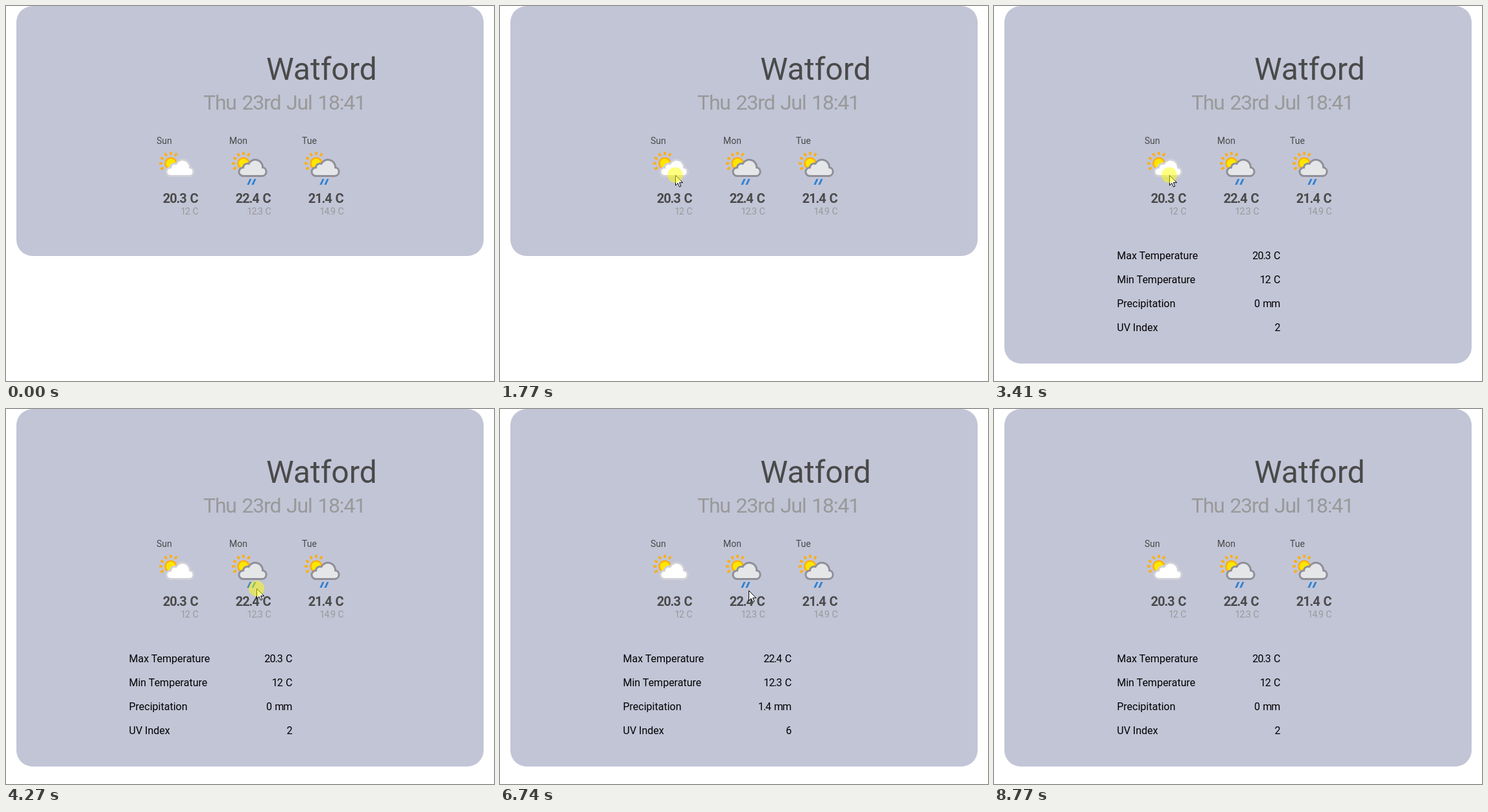
Animation, 752 px wide and 579 px high, one loop 9.79 s. Source, as an HTML page:

```html
<!DOCTYPE html>
<html lang="en">
<head>
<meta charset="utf-8">
<title>Weather forecast</title>
<style>
html, body { margin: 0; width: 100%; height: 100%; overflow: hidden; background: #fff; }
svg { display: block; width: 752px; height: 579px; font-family: Roboto, "Open Sans", sans-serif; }
.city { font-size: 48px; fill: #4a4a4a; }
.date { font-size: 32px; letter-spacing: -1.2px; word-spacing: 2px; fill: #999; }
.day { font-size: 14px; fill: #4a4a4a; }
.max, .min, .value { text-anchor: end; word-spacing: 2px; }
.max { font-size: 20px; font-weight: 600; letter-spacing: -1.1px; fill: #4a4a4a; }
.min { font-size: 14px; letter-spacing: -1px; fill: #999; }
.row, .value { font-size: 16px; }
.value { letter-spacing: -.9px; }
</style>
</head>
<body>
<svg viewBox="0 0 752 579">
  <defs>
    <g id="sun">
      <circle cx="254" cy="243" r="8.5" fill="#ffe600" stroke="#ffae10" stroke-width="2.5"/>
      <g id="rays" stroke="#ffae10" stroke-width="3.4"></g>
    </g>
    <path id="cloud" stroke-width="3" d="M253.5 262.5H282.5a6.7 6.7 0 0 0 1-13.3A11.4 11.4 0 0 0 262 243.5A6.5 6.5 0 0 0 253.5 249.5A6.5 6.5 0 0 0 253.5 262.5Z"/>
    <path id="rain" fill="#2f80d2" d="M263.5 267h3l-4 9h-3.2zm7 0h3l-4 9h-3.2z"/>
  </defs>
  <rect id="card" x="16" y="0" width="720" rx="25" fill="#c2c5d6"/>
  <text class="city" x="401" y="114">Watford</text>
  <text class="date" x="304" y="160">Thu 23rd Jul 18:41</text>
  <g id="days"></g>
  <g id="details"></g>
  <g id="pointer">
    <path id="arrow" fill="#fff" stroke="#000" d="M.5.5V16L4 12.6l2.5 5.6 2.4-1L6.5 11.7H11.7Z"/>
    <path id="beam" fill="none" stroke="#333" d="M-3-7.5H3M0-7V7M-3 7.5H3"/>
    <circle id="halo" r="12" fill="#ff0" fill-opacity=".5"/>
  </g>
</svg>
<script>
const LOOP = 9790, STEP = 77;
const $ = id => document.getElementById(id);
const text = (cls, x, y, s) => `<text class="${cls}" x="${x}" y="${y}">${s}</text>`;

const days = [
  { name: 'Sun', max: '20.3 C', min: '12 C', rain: '0 mm', uv: 2, right: 441 },
  { name: 'Mon', max: '22.4 C', min: '12.3 C', rain: '1.4 mm', uv: 6, right: 449 },
  { name: 'Tue', max: '21.4 C', min: '14.9 C', rain: '6.8 mm', uv: 2, right: 451 }
];

// Pointer glides: start, end, x, y
const glides = [
  [200, 280, 600, 470], [520, 750, 433, 283], [1010, 1450, 270, 261],
  [3730, 4110, 386, 277], [4960, 5200, 501, 284], [5500, 5580, 484, 281],
  [6280, 6520, 383, 280], [6900, 7060, 510, 282], [7290, 7450, 270, 297],
  [7690, 7770, 273, 264], [8090, 8320, 488, 309], [8630, 8700, 642, 521]
];
// Press, release, day
const clicks = [
  [1770, 1930, 0], [3410, 3570, 0], [4270, 4350, 1], [5900, 5960, 2],
  [6660, 6740, 1], [7130, 7210, 2], [7850, 8010, 0]
];

$('rays').innerHTML = [150, 180, 210, 240, 270, 300].map(a =>
  `<path d="M267 243h5" transform="rotate(${a} 254 243)"/>`).join('');

$('days').innerHTML = days.map((d, i) => `<g transform="translate(${i * 112})">
  ${text('day', 232, 213, d.name)}
  <use href="#sun"/>
  <use href="#cloud" fill="${i ? '#e4e6e8' : '#fff'}" stroke="${i ? '#8f9098' : '#d0d1d7'}"/>
  ${i ? '<use href="#rain"/>' : ''}
  ${text('max', 295.5, 304, d.max)}${text('min', 295.5, 322, d.min)}</g>`).join('');

function details(d) {
  const rows = [['Max Temperature', d.max], ['Min Temperature', d.min], ['Precipitation', d.rain], ['UV Index', d.uv]];
  return rows.map(([label, value], i) =>
    text('row', 189.5, 391 + 37 * i, label) + text('value', d.right - .5, 391 + 37 * i, value)).join('');
}

// Each glide slows towards its end and advances in whole steps.
function pointerAt(t) {
  let x = 764, y = 818;
  for (const [start, end, tx, ty] of glides) {
    if (t < start) break;
    const n = Math.round((end - start) / STEP) + 1;
    const p = t >= end ? 1 : Math.min(1, (1 + Math.floor((t - start) / STEP)) / n);
    const e = p * (2 - p);
    x += (tx - x) * e;
    y += (ty - y) * e;
  }
  return [Math.round(x), Math.round(y)];
}

const show = (id, on) => $(id).style.display = on ? '' : 'none';
let shown;

function draw(t) {
  const pick = clicks.filter(c => c[1] <= t).pop();
  const day = pick && days[pick[2]];
  if (day !== shown) {
    $('details').innerHTML = day ? details(day) : '';
    shown = day;
  }
  $('card').setAttribute('height', day ? 552 : 386);

  const [x, y] = pointerAt(t);
  const overText = y > 295 && y < 325;
  $('pointer').setAttribute('transform', `translate(${x} ${y})`);
  show('pointer', t >= 200 && t < 8770);
  show('arrow', !overText);
  show('beam', overText);
  show('halo', clicks.some(([press, release]) => t >= press && t < release));
}

const begin = performance.now();
function tick() {
  draw((performance.now() - begin) % LOOP);
  requestAnimationFrame(tick);
}
tick();
</script>
</body>
</html>
```
